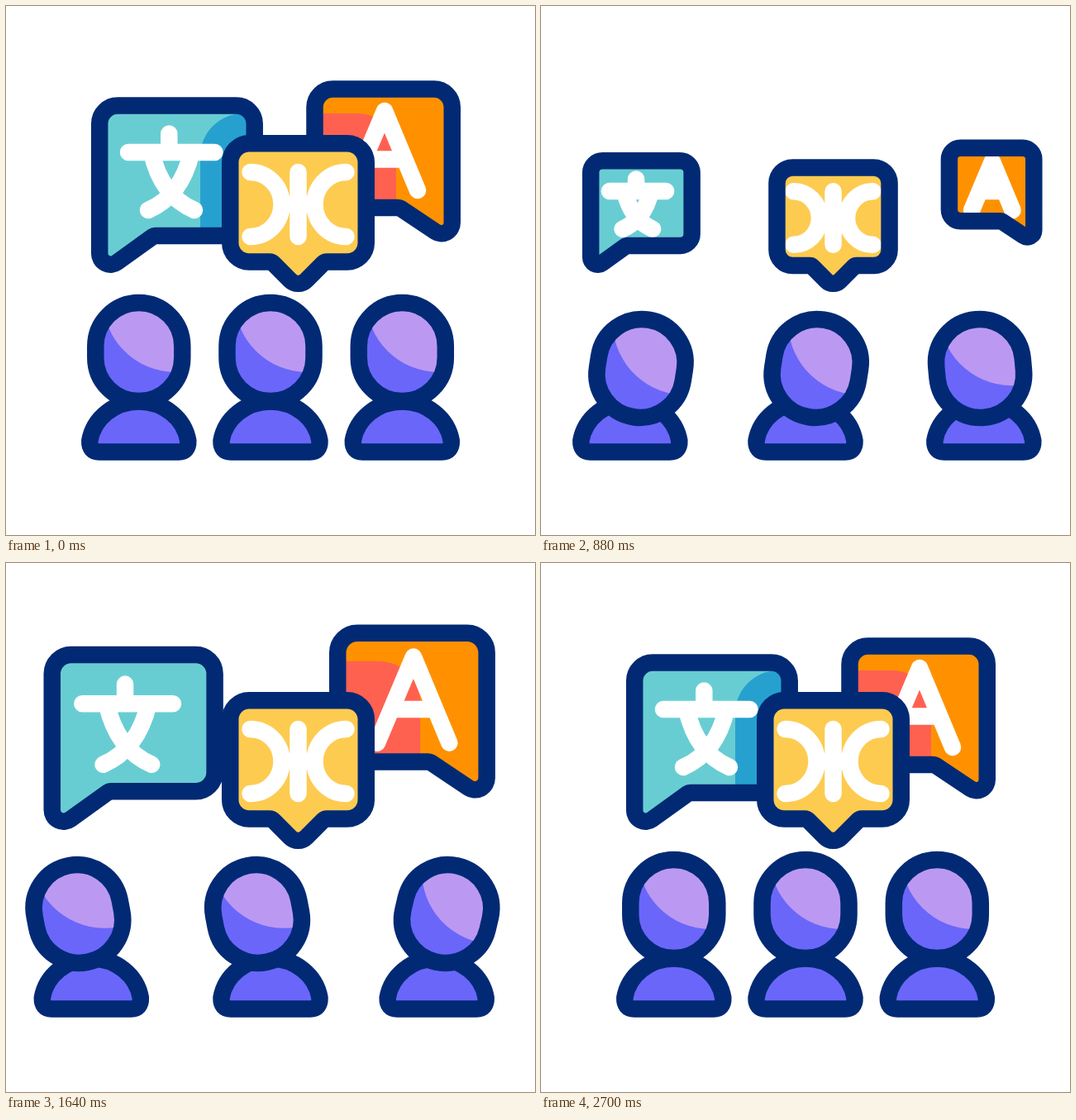
An HTML page with a canvas for the animation above (3600 ms loop, 640 px wide and 640 px high).

```html
<!DOCTYPE html>
<html lang="en">
<head>
<meta charset="utf-8">
<style>
html, body { margin: 0; width: 100%; height: 100%; overflow: hidden; background: #fff; }
canvas { display: block; }
</style>
</head>
<body>
<canvas id="stage" width="640" height="640"></canvas>
<script>
const ctx = document.getElementById('stage').getContext('2d');
const NAVY = '#022a74', LINE = 20.5, LOOP = 3600;

// Poses at shared key times; the last one is held until the loop restarts.
const times = [0, 300, 540, 660, 900, 1120, 1400, 1640, 1960, 2160, 2400, 2700];
const tracks = {
  leftX: [0, -8, -24, -36, -54, -60, -60, -57.5, -30, 3, 4, 0],
  rightX: [0, 24, 42, 48, 57, 58.5, 56, 42, -9, -5, 0, 0],
  leftSize: [1, .88, .72, .648, .66, .843, 1.07, 1.05, .945, .97, 1, 1],
  midSize: [1, 1, .98, .937, .82, .766, .86, 1, 1.057, 1.015, .967, 1],
  rightSize: [1, .96, .834, .728, .61, .6, .88, 1.085, .965, .96, 1, 1],
  lean: [0, 14, 24, 24, 12, -2, -24, -16, 7.5, 8, 5, 0],
  rightLean: [0, -5, -12, -12, -4, 4, 15, 12, -1.5, -5, -4.5, 0],
  headY: [0, 5, 14, 17, 20, 19, 12, 6, 1, 0, 0, 0],
  leftShade: [0, 14, 35, 45, 70, 70, 70, 70, 32, 6, 0, 0],
  rightShade: [0, -24, -50, -63, -70, -70, -40, -7, 0, 0, 0, 0]
};

function slope(v, i) {
  if (i === 0 || i === v.length - 1) return 0;
  if ((v[i] - v[i - 1]) * (v[i + 1] - v[i]) <= 0) return 0;
  return (v[i + 1] - v[i - 1]) / (times[i + 1] - times[i - 1]);
}

// Smooth curve through the keys, level at every turning point.
function at(v, t) {
  let i = 0;
  while (i < times.length - 2 && t >= times[i + 1]) i++;
  const d = times[i + 1] - times[i], u = Math.min(1, (t - times[i]) / d);
  const w = u * u * (3 - 2 * u);
  return v[i] + (v[i + 1] - v[i]) * w +
    d * u * (1 - u) * (slope(v, i) * (1 - u) - slope(v, i + 1) * u);
}

// Closed polygon from [x, y, corner radius] points.
function rounded(points) {
  const p = new Path2D(), [a, b] = points;
  p.moveTo((a[0] + b[0]) / 2, (a[1] + b[1]) / 2);
  points.forEach((_, i) => {
    const [x, y, r] = points[(i + 1) % points.length];
    const [nx, ny] = points[(i + 2) % points.length];
    p.arcTo(x, y, nx, ny, r);
  });
  p.closePath();
  return p;
}

function roundRect(x, y, w, h, r) {
  const p = new Path2D();
  p.roundRect(x, y, w, h, r);
  return p;
}

function circle(x, y, r) {
  const p = new Path2D();
  p.arc(x, y, r, 0, 7);
  return p;
}

const bubbles = {
  left: {
    anchor: [113, 312.75], color: '#68cdd2', shadeColor: '#26a1cf',
    shape: rounded([[113.2, 120.5, 22], [300.7, 120.5, 22], [300.7, 278, 22], [179, 278, 5], [113.2, 325.2, 13.2]]),
    shade: roundRect(235, 130, 200, 250, 52),
    glyph: new Path2D('M148 177H252.5M197.3 154.5V177M176 177Q188 230 228 247M224.5 177Q212 230 172 247')
  },
  right: {
    anchor: [539.75, 286], color: '#ff9100', shadeColor: '#ff6150',
    shape: rounded([[373.5, 100.5, 22], [539.75, 100.5, 22], [539.75, 286.5, 13], [476, 244, 5], [373.5, 244, 22]]),
    shade: roundRect(250, 130, 222, 250, 46),
    glyph: new Path2D('M417.5 223L458 127L498 223M434 185.5H482')
  },
  mid: {
    anchor: [353.5, 336], color: '#fdcb50',
    shape: rounded([[271.25, 166.25, 23], [435.75, 166.25, 23], [435.75, 309.5, 23], [385.5, 309.5, 6],
      [353.5, 341.5, 13.9], [321.5, 309.5, 6], [271.25, 309.5, 23]]),
    glyph: new Path2D('M353.5 201V279M295.5 201A38 39 0 0 1 295.5 279M411.5 201A38 39 0 0 0 411.5 279M338 240H369')
  }
};
const body = new Path2D('M-59.5 526C-55 499 -30 478.5 0 478.5S55 499 59.5 526Q60 539.5 48 539.5H-48Q-60 539.5 -59.5 526Z');
const head = roundRect(-52.5, -59.5, 105, 119, 52.5);
const headLight = circle(44.5, -63.5, 88);

function place(path, matrix) {
  const p = new Path2D();
  p.addPath(path, matrix);
  return p;
}

function fill(path, color) {
  ctx.fillStyle = color;
  ctx.fill(path);
}

function stroke(path, color) {
  ctx.strokeStyle = color;
  ctx.stroke(path);
}

function inside(path, paint) {
  ctx.save();
  ctx.clip(path);
  paint();
  ctx.restore();
}

// Shapes scale about their anchor while line widths stay constant.
function drawBubble({ anchor: [x, y], color, shape, shade, shadeColor, glyph }, dx, size, shadeX = 0) {
  const m = new DOMMatrix().translate(x + dx, y).scale(size).translate(-x, -y);
  const outline = place(shape, m);
  fill(outline, color);
  inside(outline, () => {
    if (shade) fill(place(shade, new DOMMatrix().translate(shadeX, -.28 * shadeX).multiply(m)), shadeColor);
    stroke(place(glyph, m), '#fff');
  });
  stroke(outline, NAVY);
}

function drawPerson(x, lean, tilt, y) {
  const torso = place(body, new DOMMatrix().translate(x, 0));
  fill(torso, '#6a66fa');
  stroke(torso, NAVY);
  const m = new DOMMatrix().translate(x + lean, 418.5 + y).rotate(tilt);
  const face = place(head, m);
  fill(face, '#6a66fa');
  inside(face, () => fill(place(headLight, m), '#bb99f2'));
  stroke(face, NAVY);
}

function draw() {
  const t = performance.now() % LOOP, pose = {};
  for (const name in tracks) pose[name] = at(tracks[name], t);
  const { leftX, rightX, lean, rightLean, headY } = pose;

  ctx.fillStyle = '#fff';
  ctx.fillRect(0, 0, 640, 640);
  ctx.lineWidth = LINE;
  ctx.lineCap = ctx.lineJoin = 'round';

  drawBubble(bubbles.left, leftX, pose.leftSize, pose.leftShade);
  drawBubble(bubbles.right, rightX, pose.rightSize, pose.rightShade);
  drawBubble(bubbles.mid, 0, pose.midSize);
  drawPerson(160.8 + leftX, lean, lean * .68, headY);
  drawPerson(320, lean, lean * .68, headY);
  drawPerson(479.3 + rightX, rightLean, rightLean * 1.1, headY);
  requestAnimationFrame(draw);
}
draw();
</script>
</body>
</html>
```
